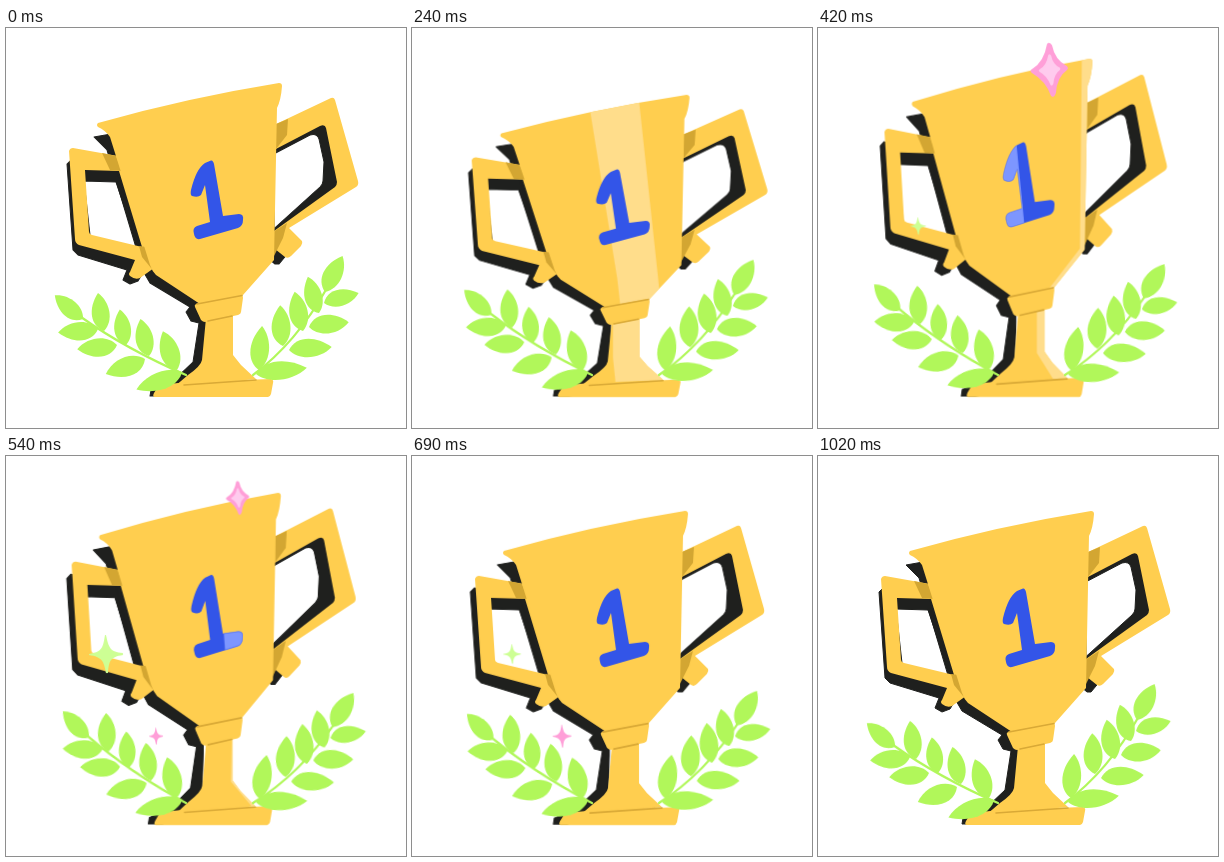
Animation, 400 px wide and 400 px high, one loop 1.05 s. Source, as an HTML page without scripts:

```html
<!DOCTYPE html>
<html lang="en">
<head>
<meta charset="utf-8">
<title>Trophy</title>
<style>
html, body { margin: 0; width: 100%; height: 100%; overflow: hidden; background: #fff; }
svg { display: block; width: 100vw; height: 100vh; }

.gold { fill: #ffce4f; }
.dark { fill: #d3a632; }
.line { fill: none; stroke: #d9a936; stroke-width: 1.6; stroke-linecap: round; }
.light { fill: #ffdd8b; }
.shadow { fill: #1f201e; stroke: #1f201e; stroke-linejoin: round; }
.blue { fill: #3355e8; }
.sky { fill: #7d96ff; }
.leaves { fill: #b1f75a; }
.twig { fill: none; stroke: #b1f75a; stroke-width: 2.2; stroke-linecap: round; }
.pink { fill: #ff9fd8; }
.blush { fill: #ffcbee; }
.lime { fill: #cdff94; }

.cup, .shadow, .sway, .glint, .stem-glint, .num-glint, .spark {
  animation: 1050ms linear infinite;
}
.cup { transform-origin: 210px 368px; animation-name: squash; animation-timing-function: cubic-bezier(.37,0,.63,1); }
.shadow { animation-name: drift; animation-timing-function: cubic-bezier(.37,0,.63,1); }
.sway { animation-name: sway; animation-timing-function: cubic-bezier(.37,0,.63,1); }
.left { transform-origin: 180px 347px; }
.right { transform-origin: 247px 347px; }
.glint { animation-name: glint; }
.stem-glint { animation-name: stem; }
.num-glint { animation-name: num; }
.s1 { animation-name: pop1; }
.s2 { animation-name: pop2; }
.s3 { animation-name: pop3; }

@keyframes squash {
  0%, 67%, 100% { transform: scale(1, 1); }
  14.29% { transform: scale(1.035, .931); }
  42.86% { transform: scale(.975, 1.081); }
}
@keyframes drift {
  0%, 100% { transform: translateX(0); }
  57% { transform: translateX(-3px); }
}
@keyframes sway {
  0%, 100% { transform: rotate(0deg); }
  50% { transform: rotate(5.4deg); }
}
@keyframes glint {
  0% { d: path("M-30 50L18 50L78 248L120 290L80 290L40 248Z"); }
  5.71% { d: path("M14 50L62 50L125 248L170 290L130 290L85 248Z"); }
  11.43% { d: path("M64 50L114 50L171 248L215 290L170 290L131 248Z"); }
  22.86% { d: path("M175 50L225 50L245 246L249 290L210 290L205 246Z"); }
  40% { d: path("M265 50L315 50L310 232L262 290L213 290L263 231Z"); }
  51.43%, 100% { d: path("M285 50L335 50L330 232L282 290L240 290L285 231Z"); }
}
@keyframes stem {
  0%, 4% { d: path("M165 285L190 285L188 328L160 360L120 360L165 328Z"); }
  11.43% { d: path("M190 285L222 285L220 328L212 360L160 360L185 328Z"); }
  22.86% { d: path("M201 285L232 285L232 328L262 360L204 360L201 328Z"); }
  40% { d: path("M219 285L245 285L245 328L275 360L241 360L219 328Z"); }
  51.43% { d: path("M226 285L250 285L250 328L280 360L254 360L225 328Z"); }
  57%, 100% { d: path("M229 285L252 285L252 328L284 360L260 360L229 328Z"); }
}
@keyframes num {
  0%, 34.29% { transform: translateX(126px); }
  57.14%, 100% { transform: translateX(238px); }
}
@keyframes pop1 {
  0%, 25.7% { transform: scale(0); }
  40% { transform: scale(1); }
  51.43% { transform: scale(.63); }
  61%, 100% { transform: scale(0); }
}
@keyframes pop2 {
  0%, 34.3% { transform: scale(0); }
  40% { transform: scale(.45); }
  51.43% { transform: scale(1); }
  65.71% { transform: scale(.52); }
  74.3%, 100% { transform: scale(0); }
}
@keyframes pop3 {
  0%, 42.8% { transform: scale(0); }
  51.43% { transform: scale(.74); }
  60% { transform: scale(1.12); }
  65.71% { transform: scale(1); }
  80%, 100% { transform: scale(0); }
}
</style>
</head>
<body>
<svg viewBox="0 0 400 400">
  <defs>
    <path id="leaf" d="M0 0C7 -13 25 -13.500 40 0C29 11 9 12 0 0Z"/>
    <path id="star" d="M-3 -26Q-1 -29 2 -25Q5 -10 17 -4Q19 -2 17 0Q7 7 6 23Q4 29 1 26Q-4 11 -18 3Q-21 1 -18 -1Q-6 -8 -3 -26Z"/>
    <path id="thin" d="M0 -19C3 -6 4 -2 17 -1L17 1C4 3 3 7 2 19L0 19C-2 7 -4 3 -17 1L-17 0C-4 -2 -3 -6 -1 -19Z"/>
    <path id="bowl" d="M92 95Q180 70 273 55Q276 55 276 58Q275 72 271 80L268 232L237 267L194 276L150 247Q146 243 144 237L104 109Q99 102 92 99Q90 97 92 95Z"/>
    <path id="foot" d="M200 290L227 284V327L235 337L250 351L168 359L182 347Q195 338 196 332Z"/>
    <path id="one" d="M199 135L205 132.500Q207 132 208 136L217 188L233 186Q238 186 237 192Q237 198 232 200L194 211Q189 212 188 206Q186 200 191 198L204 194L199 157L195 167Q192 170 186 168Q184 167 185 162Q190 141 199 135Z"/>
    <clipPath id="in-bowl"><use href="#bowl"/></clipPath>
    <clipPath id="in-foot"><use href="#foot"/></clipPath>
    <clipPath id="in-one"><use href="#one"/></clipPath>
  </defs>

  <g class="cup">
    <g class="shadow" fill-rule="evenodd">
      <path d="M88 109L105 106L200 240V300L198 360L158 368H144L145 362L168 352L187 334L193 295L185 293L180 284L184 279L144 255L137 243L101 122Z"/>
      <path d="M61 136L65 132L110 140L140 240L132 253L124 256L117 252L121 242L72 227L67 222ZM78 153L110 154L134 225L85 216Z"/>
      <path d="M268 110L322 92L336 158L268 207ZM262 129L304 107Q311 105 313 111L318 134L317 153Q317 156 314 159L262 206Z"/>
      <path d="M266 212L283 224L273 236H269L262 230Z"/>
    </g>

    <g class="gold" fill-rule="evenodd">
      <path d="M63 123Q64 120 67 120L112 128L148 240L134 250Q129 252 124 248Q122 246 124 244L129 232L73 217Q69 215 69 211ZM79 142L83 204Q83 206 86 207L136 219L113 143Z"/>
      <path d="M268 97L325 70Q328 69 329 72L352 153Q353 157 350 159L283 200L296 213Q297 215 295 218L285 228Q282 231 279 229L264 217ZM268 122L314 98Q319 96 320 100L331 154Q331 157 329 159L268 203Z"/>
    </g>
    <g class="dark">
      <path d="M96 125L110 128L116 143L104 142Z"/>
      <path d="M133 218L141 219L149 242L145 240L136 229Z"/>
      <path d="M270 96L282 91L281 107L270 121Z"/>
      <path d="M267 204L281 195L277 210L267 230Z"/>
    </g>

    <use href="#foot" class="gold"/>
    <g clip-path="url(#in-foot)"><path class="light stem-glint"/></g>
    <path class="gold" d="M153 357L182 354L265 351Q268 352 267 355L265 366Q264 369 262 369H149Q146 369 148 365Z"/>
    <path class="line" d="M178 357L250 352"/>

    <use href="#bowl" class="gold"/>
    <g clip-path="url(#in-bowl)"><path class="light glint"/></g>
    <path class="gold" d="M190 276L235 267Q237 267 237 270L235 284Q235 286 232 287L199 294Q197 294 195 292L189 279Q188 277 190 276Z"/>
    <path class="line" d="M191 276L236 267.500M202 293L226 288"/>

    <use href="#one" class="blue"/>
    <g clip-path="url(#in-one)"><path class="sky num-glint" d="M0 100H40L53 220H10Z"/></g>
  </g>

  <g class="leaves sway left">
    <path class="twig" d="M180 347Q120 321 75 289"/>
    <use href="#leaf" transform="translate(77 291) rotate(220) scale(.92)"/>
    <use href="#leaf" transform="translate(98 303) rotate(261) scale(.96)"/>
    <use href="#leaf" transform="translate(92 301) rotate(175)"/>
    <use href="#leaf" transform="translate(120 317) rotate(260) scale(.9)"/>
    <use href="#leaf" transform="translate(111 317) rotate(174)"/>
    <use href="#leaf" transform="translate(143 328) rotate(257) scale(.95)"/>
    <use href="#leaf" transform="translate(139 331) rotate(159) scale(1.05)"/>
    <use href="#leaf" transform="translate(171 342) rotate(250) scale(1.03)"/>
    <use href="#leaf" transform="translate(176 344) rotate(159) scale(1.22 .95)"/>
  </g>
  <g class="leaves sway right">
    <path class="twig" d="M247 347Q290 315 321 260"/>
    <use href="#leaf" transform="translate(319 264) rotate(-64)"/>
    <use href="#leaf" transform="translate(318 275) rotate(-16) scale(.9)"/>
    <use href="#leaf" transform="translate(303 299) rotate(-7)"/>
    <use href="#leaf" transform="translate(283 322) rotate(-4) scale(1.07 1)"/>
    <use href="#leaf" transform="translate(250 346) rotate(-7) scale(1.28 1)"/>
    <use href="#leaf" transform="translate(313 285) rotate(-107) scale(.95)"/>
    <use href="#leaf" transform="translate(297 303) rotate(-102)"/>
    <use href="#leaf" transform="translate(277 318) rotate(-94) scale(1.02)"/>
    <use href="#leaf" transform="translate(253 342) rotate(-86) scale(1.1 1)"/>
  </g>

  <g transform="translate(232 42)"><g class="spark s1">
    <use href="#star" class="pink"/>
    <use href="#star" class="blush" transform="scale(.58)"/>
  </g></g>
  <g transform="translate(100 198)"><g class="spark s2"><use href="#thin" class="lime"/></g></g>
  <g transform="translate(150 280)"><g class="spark s3"><use href="#thin" class="pink" transform="scale(.55 .6)"/></g></g>
</svg>
</body>
</html>
```
